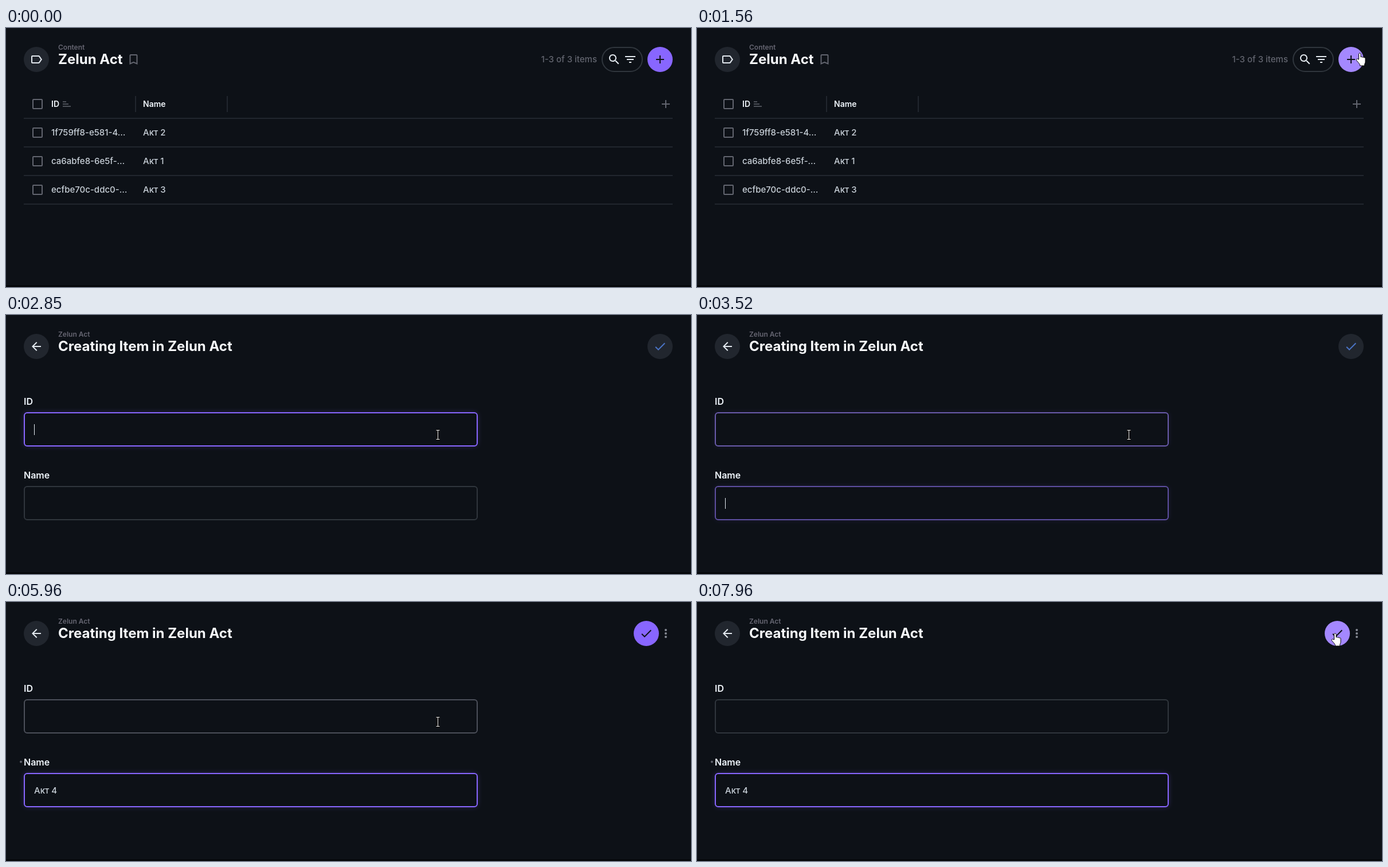
Write an HTML page that moves like this. It is 1195 px wide and 453 px high and loops after 7.99 s.

```html
<!DOCTYPE html>
<html lang="en">
<head>
<meta charset="utf-8">
<title>Creating an item</title>
<style>
  html, body { margin: 0; width: 100%; height: 100%; overflow: hidden; background: #0d1117; }
  svg { display: block; font-family: Inter, "Open Sans", sans-serif; font-weight: 500; }
  text { white-space: pre; }
  .small { font-size: 12px; font-weight: 600; fill: #666672; }
  .title { font-size: 24px; font-weight: 700; fill: #f8fafc; }
  .head { font-size: 14px; font-weight: 600; fill: #f0f6fc; }
  .label { font-size: 16px; font-weight: 600; fill: #f0f6fc; }
  .cell { font-size: 15px; fill: #c9d1d9; }
  .muted { fill: #62656f; }
  .rule { fill: #21262e; }
  .line { fill: none; stroke: #62656f; stroke-width: 2; }
  .icon { fill: #e3e9ef; }
  .glow { fill: #8866ff; filter: url(#blur); }
</style>
</head>
<body>
<svg width="1195" height="453" viewBox="0 0 1195 453">
  <defs>
    <filter id="blur" x="-5%" y="-50%" width="110%" height="200%"><feGaussianBlur stdDeviation="5"/></filter>
    <path id="check" d="M9 16.17 4.83 12l-1.42 1.41L9 19 21 7l-1.41-1.41z"/>
  </defs>
  <rect width="1195" height="453" fill="#0d1117"/>
  <rect y="450" width="1195" height="3" fill="#05070a"/>
  <circle cx="53" cy="55" r="22" class="rule"/>

  <g id="list">
    <path class="icon" transform="translate(41 43)" d="M17.63 5.84C17.27 5.33 16.67 5 16 5L5 5.01C3.9 5.01 3 5.9 3 7v10c0 1.1.9 1.99 2 1.99L16 19c.67 0 1.27-.33 1.63-.84L22 12l-4.37-6.16zM16 17H5V7h11l3.55 5L16 17z"/>
    <text x="91" y="38" class="small">Content</text>
    <text x="91" y="63" class="title">Zelun Act</text>
    <path class="muted" transform="translate(210.5 43)" d="M17 3H7c-1.1 0-2 .9-2 2v16l7-3 7 3V5c0-1.1-.9-2-2-2zm0 15l-5-2.18L7 18V5h10v13z"/>
    <text x="1031" y="60" class="cell muted" text-anchor="end" style="fill:#62656f">1-3 of 3 items</text>
    <rect x="1040" y="34" width="70" height="42" rx="21" fill="none" stroke="#30363d" stroke-width="2"/>
    <path class="icon" transform="translate(1049 43)" d="M15.5 14h-.79l-.28-.27C15.41 12.59 16 11.11 16 9.5 16 5.91 13.09 3 9.5 3S3 5.91 3 9.5 5.91 16 9.5 16c1.61 0 3.09-.59 4.23-1.57l.27.28v.79l5 4.99L20.49 19l-4.99-5zm-6 0C7.01 14 5 11.99 5 9.5S7.01 5 9.5 5 14 7.01 14 9.5 11.99 14 9.5 14z"/>
    <path class="icon" transform="translate(1077 43)" d="M10 18h4v-2h-4v2zM3 6v2h18V6H3zm3 7h12v-2H6v2z"/>
    <circle id="add" cx="1141" cy="55" r="22"/>
    <path d="M1134 55h14M1141 48v14" stroke="#0d1117" stroke-width="2"/>
    <rect x="47" y="125" width="16" height="16" rx="1" class="line"/>
    <text x="79" y="138" class="head">ID</text>
    <path d="M99 129h6M99 133h10M99 137h14" class="line" style="stroke-width:1.5"/>
    <text x="239" y="138" class="head">Name</text>
    <path d="M1144 133h14M1151 126v14" class="line"/>
    <path class="rule" d="M225 119h2v28h-2zM385 119h2v28h-2zM31 157h1132v2H31z"/>
    <g id="rows"></g>
  </g>

  <g id="form">
    <path class="icon" transform="translate(41 43)" d="M20 11H7.83l5.59-5.59L12 4l-8 8 8 8 1.41-1.41L7.83 13H20v-2z"/>
    <text x="91" y="38" class="small">Zelun Act</text>
    <text x="91" y="63" class="title">Creating Item in Zelun Act</text>
    <g id="save"><circle cy="55" r="22"/><use href="#check" x="-12" y="43"/></g>
    <g id="edited">
      <g fill="#858993"><circle cx="1151" cy="49" r="2"/><circle cx="1151" cy="55" r="2"/><circle cx="1151" cy="61" r="2"/></g>
      <circle cx="26" cy="279.5" r="2" class="muted"/>
    </g>
    <text x="31" y="157" class="label">ID</text>
    <text x="31" y="286" class="label">Name</text>
    <g id="fields"></g>
    <text id="value" x="49" y="335" class="cell"></text>
    <rect id="caret" width="1" height="19" fill="#e6edf3"/>
  </g>

  <g id="cursor">
    <path id="arrow" d="M0 0V15.5L3.6 12.2 6.2 18 8.8 16.8 6.3 11.3H11Z" fill="#fff" stroke="#000"/>
    <path id="hand" transform="translate(-6 -1)" fill="#fff" stroke="#000" stroke-linejoin="round" d="M5 12V2.5C5 .5 8.5.5 8.5 2.5V8c.8-1.2 2.6-.8 2.8.4.8-1 2.4-.6 2.6.6.9-.8 2.6-.2 2.6 1.2V16c0 2-1.5 3.5-1.5 5.5V23H7v-1.500C6 18.500 3.500 17 1 13.500-.2 11.500 2 10.300 3.500 11.300Z"/>
    <g id="beam"><path d="M-3.500-7.500H3.500M-3.500 8.500H3.500M0-7.500V8.500" stroke="#000" stroke-width="3"/><path d="M-3-7.500H3M-3 8.500H3M0-7.500V8.500" stroke="#fff"/></g>
    <g id="blocked" stroke="#c4121a" stroke-width="2.500"><circle r="6.500" fill="#fff"/><path d="M-4.500-4.500 4.500 4.500"/></g>
  </g>
</svg>
<script>
const LOOP = 7990;
const OPEN_FORM = 1620, FOCUS_ID = 1840, FOCUS_NAME = 3490, FIRST_KEY = 4050;
const $ = id => document.getElementById(id);
const show = (el, on) => el.setAttribute('display', on ? 'inline' : 'none');
const clamp = v => Math.max(0, Math.min(1, v));
const fade = (t, start, length) => 1 - (1 - clamp((t - start) / length)) ** 2;

// Time, x, y of the pointer's hot spot
const route = [
  [500, 964, 425], [590, 982, 402], [680, 1030, 305], [740, 1053, 250], [820, 1078, 154],
  [960, 1108, 110], [1120, 1140, 66], [1270, 1153, 46], [1360, 1155, 44],
  [1890, 1155, 44], [2010, 1138, 90], [2130, 1105, 155], [2250, 930, 190], [2370, 788, 206], [2540, 753, 209],
  [6810, 753, 209], [6960, 800, 207], [7110, 900, 190], [7280, 1030, 130], [7420, 1095, 92], [7520, 1108, 82],
  [7620, 1108, 82], [7650, 1108, 81], [7810, 1108, 81], [7900, 1112, 56], [7960, 1112, 55]
];

// Time, typed text, caret x
const typing = [[0, '', 49], [FIRST_KEY, 'А', 59], [4410, 'Ак', 67], [4820, 'Акт', 75], [5100, 'Акт ', 79], [5390, 'Акт 4', 90]];
const caretOff = [[0, FOCUS_ID], [2340, 2850], [3340, FOCUS_NAME], [3990, FIRST_KEY], [5960, 6450], [6950, 7450], [7960, LOOP]];

const rows = [['1f759ff8-e581-4…', 'Акт 2'], ['ca6abfe8-6e5f-…', 'Акт 1'], ['ecfbe70c-ddc0-…', 'Акт 3']];
$('rows').innerHTML = rows.map(([id, name], i) => {
  const y = 183 + 50 * i;
  return `<rect x="31" y="${y - 24}" width="1132" height="48" fill="#161b22"/>
    <rect x="31" y="${y + 24}" width="1132" height="2" class="rule"/>
    <rect x="47" y="${y - 8}" width="16" height="16" rx="1" class="line"/>
    <text x="79" y="${y + 5}" class="cell">${id}</text>
    <text x="239" y="${y + 5}" class="cell">${name}</text>`;
}).join('');
const highlights = [...$('rows').querySelectorAll('[fill]')];

$('fields').innerHTML = [171, 300].map(y =>
  `<rect x="32" y="${y}" width="790" height="58" rx="5" class="glow"/>
   <rect x="32" y="${y}" width="790" height="58" rx="5" fill="#0d1117" stroke-width="2"/>`).join('');
const [idGlow, idBox, nameGlow, nameBox] = $('fields').children;
const [saveDisc, saveCheck] = $('save').children;

function mix(from, to, k) {
  return `rgb(${from.map((v, i) => Math.round(v + (to[i] - v) * k))})`;
}
const GREY = [33, 38, 46], PURPLE = [136, 102, 255], LIGHT = [164, 136, 255];
const BORDER = [48, 54, 61], BORDER_HOVER = [76, 80, 90];

function pointerAt(t) {
  const next = route.findIndex(p => p[0] > t);
  if (next === 0) return route[0].slice(1);
  if (next < 0) return route.at(-1).slice(1);
  const [t0, x0, y0] = route[next - 1], [t1, x1, y1] = route[next];
  const k = (t - t0) / (t1 - t0);
  return [x0 + (x1 - x0) * k, y0 + (y1 - y0) * k];
}

function paintField(box, glow, focus, hovered) {
  box.setAttribute('stroke', mix(hovered ? BORDER_HOVER : BORDER, PURPLE, focus));
  glow.setAttribute('opacity', 0.3 * focus);
}

function render(t) {
  const onForm = t >= OPEN_FORM, edited = t >= FIRST_KEY;
  const [x, y] = pointerAt(t);
  const saveX = edited ? 1117 : 1141;
  const overButton = Math.hypot(x - saveX, y - 55) < 22;
  const inField = top => onForm && x > 31 && x < 823 && y > top && y < top + 60;
  const overRow = !onForm && y > 158 && y < 308;

  show($('list'), !onForm);
  show($('form'), onForm);

  const laggedY = pointerAt(t - 30)[1];
  highlights.forEach((el, i) => show(el, t >= 500 && laggedY >= 158 + 50 * i && laggedY < 208 + 50 * i));
  $('add').setAttribute('fill', mix(PURPLE, LIGHT, fade(t, 1240, 120)));

  $('save').setAttribute('transform', `translate(${saveX} 0)`);
  saveDisc.setAttribute('fill', t > 7800
    ? mix(PURPLE, LIGHT, fade(t, 7850, 110))
    : mix(GREY, PURPLE, fade(t, FIRST_KEY, 130)));
  saveCheck.setAttribute('fill', edited ? '#0d1117' : '#4a74c6');
  show($('edited'), edited);

  const toName = fade(t, FOCUS_NAME, 100);
  paintField(idBox, idGlow, fade(t, FOCUS_ID - 10, 125) * (1 - toName), inField(170));
  paintField(nameBox, nameGlow, toName, inField(299));

  const [, text, caretX] = typing.findLast(k => k[0] <= t);
  $('value').textContent = text;
  $('caret').setAttribute('x', caretX);
  $('caret').setAttribute('y', t < FOCUS_NAME ? 191 : 320);
  show($('caret'), !caretOff.some(([from, to]) => t >= from && t < to));

  const kind = inField(170) || inField(299) ? 'beam'
    : overButton && onForm && !edited ? 'blocked'
    : overButton || overRow ? 'hand' : 'arrow';
  for (const el of $('cursor').children) show(el, el.id === kind);
  show($('cursor'), t >= 500);
  $('cursor').setAttribute('transform', `translate(${Math.round(x) + 0.5} ${Math.round(y)})`);
}

let start;
function tick(now) {
  start ??= now;
  render((now - start) % LOOP);
  requestAnimationFrame(tick);
}
render(0);
requestAnimationFrame(tick);
</script>
</body>
</html>
```
